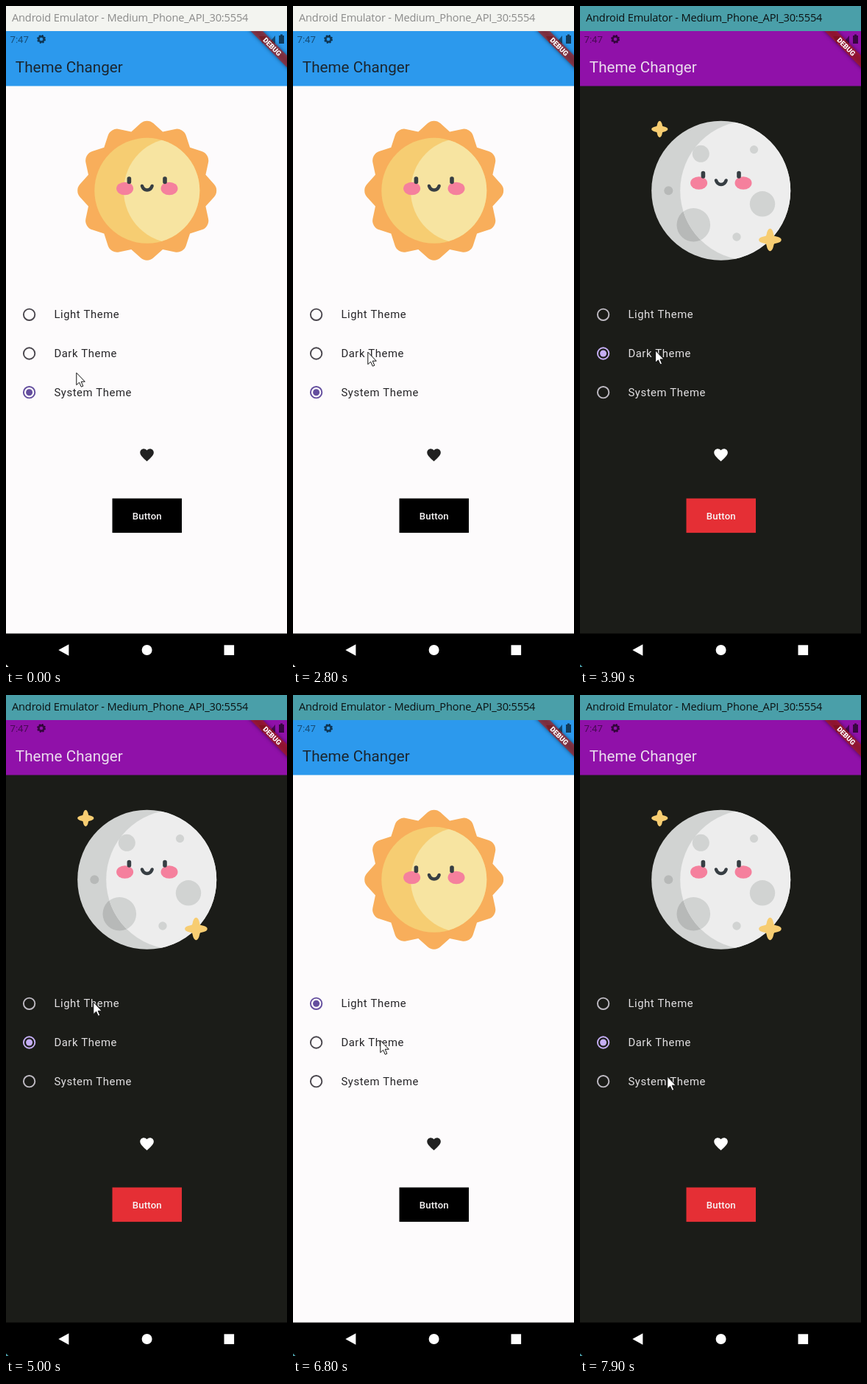
An HTML page with a canvas that plays this animation: 382 by 896 pixels, repeating every 8000 ms.

```html
<!DOCTYPE html>
<html lang="en">
<head>
<meta charset="utf-8">
<title>Theme Changer</title>
<style>
html, body { margin: 0; width: 100%; height: 100%; overflow: hidden; background: #fdfbfc; }
canvas { display: block; width: 382px; height: 896px; }
</style>
</head>
<body>
<canvas id="stage"></canvas>
<script>
const W = 382, H = 896, LOOP = 8000, TAU = Math.PI * 2;
const canvas = document.getElementById('stage');
const ctx = canvas.getContext('2d');
const dpr = window.devicePixelRatio || 1;
canvas.width = W * dpr;
canvas.height = H * dpr;

const LIGHT = {
  page: '#fdfbfc', bar: '#2c99ed', title: '#1b2630', ink: [38, 37, 40], ring: '#4a464d',
  accent: '#644e9e', heart: '#212121', button: '#000', press: [0, 0.038]
};
const DARK = {
  page: '#1b1c18', bar: '#9011a9', title: '#ebdcee', ink: [226, 224, 226], ring: '#bfbbc3',
  accent: '#c5aef5', heart: '#fff', button: '#e52f35', press: [255, 0.17]
};

const ROWS = ['Light Theme', 'Dark Theme', 'System Theme'];
const rowY = i => 418.3 + i * 52.7;

// Each tap: press time, switch time, chosen row
const TAPS = [
  { press: 2850, at: 2940, row: 1 },
  { press: 5050, at: 5125, row: 0 },
  { press: 6850, at: 6940, row: 1 }
];

// Pointer moves: start, end, target x, target y
const HOME = [96, 497];
const MOVES = [
  [1900, 2600, 102, 469],
  [3800, 4600, 119, 416],
  [5600, 6300, 119, 468],
  [7200, 7700, 119, 517]
];

const HEART = new Path2D('M12 21.35l-1.45-1.32C5.4 15.36 2 12.28 2 8.5 2 5.42 4.42 3 7.5 3c1.74 0 3.41.81 4.5 2.09C13.09 3.81 14.76 3 16.5 3 19.58 3 22 5.42 22 8.5c0 3.78-3.4 6.86-8.55 11.54L12 21.35z');
const ARROW = new Path2D('M0 0V16.5L3.8 13L6.5 19L9 18L6.4 12H11.5Z');

const clamp = v => Math.max(0, Math.min(1, v));
const mix = (a, b, k) => a + (b - a) * k;
const ease = k => k * k * (3 - 2 * k);

function rect(x, y, w, h, color) {
  ctx.fillStyle = color;
  ctx.fillRect(x, y, w, h);
}

function oval(x, y, rx, ry, color) {
  ctx.beginPath();
  ctx.ellipse(x, y, rx, ry, 0, 0, TAU);
  ctx.fillStyle = color;
  ctx.fill();
}

const disc = (x, y, r, color) => oval(x, y, r, r, color);

function ring(x, y, r, width, color) {
  ctx.beginPath();
  ctx.arc(x, y, r, 0, TAU);
  ctx.strokeStyle = color;
  ctx.lineWidth = width;
  ctx.stroke();
}

function poly(points, color) {
  ctx.beginPath();
  points.forEach(p => ctx.lineTo(...p));
  ctx.closePath();
  ctx.fillStyle = color;
  ctx.fill();
}

function text(str, x, y, font, color, spacing = 0, align = 'left') {
  ctx.font = font;
  ctx.letterSpacing = spacing + 'px';
  ctx.textAlign = align;
  ctx.fillStyle = color;
  ctx.fillText(str, x, y);
}

function clipDisc(x, y, r, draw) {
  ctx.save();
  ctx.beginPath();
  ctx.arc(x, y, r, 0, TAU);
  ctx.clip();
  draw();
  ctx.restore();
}

function face(dy) {
  const ink = '#373e43';
  for (const side of [-1, 1]) {
    oval(191.8 + side * 30.2, 247.5 + dy, 11.5, 8.7, '#f5809d');
    ctx.beginPath();
    ctx.roundRect(191.7 + side * 24.3 - 2.8, 231.3 + dy, 5.6, 10, 2.8);
    ctx.fillStyle = ink;
    ctx.fill();
  }
  ctx.beginPath();
  ctx.moveTo(185, 244 + dy);
  ctx.bezierCurveTo(187.5, 251.3 + dy, 196.1, 251.3 + dy, 198.6, 244 + dy);
  ctx.strokeStyle = ink;
  ctx.lineWidth = 4.5;
  ctx.lineCap = 'round';
  ctx.stroke();
  ctx.lineCap = 'butt';
}

function sun() {
  const at = i => {
    const a = i * TAU / 24 - TAU / 4, r = i % 2 ? 82.5 : 99;
    return [191.7 + r * Math.cos(a), 250.2 + r * Math.sin(a)];
  };
  ctx.beginPath();
  ctx.moveTo(...at(-1));
  for (let i = 0; i < 24; i += 2) {
    ctx.arcTo(...at(i), ...at(i + 1), 13);
    ctx.lineTo(...at(i + 1));
  }
  ctx.closePath();
  ctx.fillStyle = '#f8ae5b';
  ctx.fill();
  disc(191.8, 250.3, 71.5, '#f6cd72');
  clipDisc(191.8, 250.3, 71.5, () => disc(231.5, 250.3, 71.5, '#f7e4a1'));
  face(0);
}

function craters(color) {
  [[164.3, 200.3, 11.5], [236.5, 194.6, 5.6], [120.3, 250.3, 6], [248, 268.3, 17.2],
   [213, 313, 5.7], [154.3, 296.7, 22.8]].forEach(c => disc(...c, color));
}

function sparkle(x, y, r) {
  const color = '#f7cd72';
  oval(x, y, r, r * 0.37, color);
  oval(x, y, r * 0.37, r, color);
  disc(x, y, r * 0.5, color);
}

function moon() {
  disc(191.7, 250.3, 94.5, '#d1d3d2');
  craters('#b7b9b8');
  clipDisc(191.7, 250.3, 94.5, () => {
    clipDisc(230.7, 250.3, 94.5, () => {
      rect(90, 150, 200, 200, '#ededed');
      craters('#d1d3d2');
    });
  });
  face(-7.5);
  sparkle(108.3, 167, 11.2);
  sparkle(258.4, 317, 15.3);
}

function statusBar() {
  const ink = 'rgba(0,0,0,.5)';
  text('7:47', 5.5, 50, '13.2px Roboto, sans-serif', ink);
  const dark = 'rgba(0,0,0,.62)';
  ring(48, 45, 3.6, 2.6, dark);
  ctx.setLineDash([2.2, 1.9]);
  ring(48, 45, 5.2, 1.6, dark);
  ctx.setLineDash([]);
  poly([[344, 41], [354, 41], [349, 51]], ink);
  poly([[357, 51], [366, 51], [366, 40]], ink);
  rect(371, 40, 7, 11, dark);
  rect(373, 38.5, 3, 1.5, dark);
}

function banner() {
  ctx.save();
  ctx.beginPath();
  ctx.rect(0, 34, W, 817);
  ctx.clip();
  ctx.translate(W, 34);
  ctx.rotate(Math.PI / 4);
  ctx.filter = 'blur(2.5px)';
  rect(-40, 23.3, 80, 11.6, 'rgba(0,0,0,.5)');
  ctx.filter = 'none';
  rect(-40, 23.3, 80, 11.6, 'rgba(183,28,28,.63)');
  text('DEBUG', 0.8, 32.6, '900 9.6px Roboto, sans-serif', '#fff', 0, 'center');
  ctx.restore();
}

function navBar(frame) {
  rect(0, 850.6, W, 45.4, '#000');
  poly([[71.3, 873], [85.4, 865.3], [85.4, 880.8]], '#fff');
  disc(191.6, 873, 7, '#fff');
  rect(296.5, 866.3, 13.6, 13.6, '#fff');
  poly([[0, 892.5], [0, H], [3.5, H]], frame);
}

function radio(y, on, th) {
  const color = on ? th.accent : th.ring;
  ring(31.6, y, 7.7, 1.9, color);
  if (on) disc(31.6, y, 4.5, color);
}

function pointer(t) {
  let [x, y] = HOME;
  for (const [start, end, tx, ty] of MOVES) {
    const k = ease(clamp((t - start) / (end - start)));
    x = mix(x, tx, k);
    y = mix(y, ty, k);
  }
  ctx.save();
  ctx.translate(x - 0.2, y + 0.2);
  ctx.fillStyle = '#fff';
  ctx.strokeStyle = '#111';
  ctx.lineWidth = 1;
  ctx.fill(ARROW);
  ctx.stroke(ARROW);
  ctx.restore();
}

function draw(t) {
  const tap = TAPS.filter(p => t >= p.at).pop();
  const chosen = tap ? tap.row : 2;
  const th = chosen === 1 ? DARK : LIGHT;
  const focused = t >= TAPS[0].press;
  const frame = focused ? '#4a9fa9' : '#f3f4f0';

  ctx.setTransform(dpr, 0, 0, dpr, 0, 0);
  rect(0, 0, W, H, th.page);
  rect(0, 0, W, 34, frame);
  text('Android Emulator - Medium_Phone_API_30:5554', 8, 21,
    '14.6px "Open Sans", sans-serif', focused ? '#0b1112' : '#8b8b8a', -0.17);

  rect(0, 34, W, 74.5, th.bar);
  statusBar();
  text('Theme Changer', 12.8, 89.8, '20.6px Roboto, sans-serif', th.title, 0.05);
  if (th === DARK) moon(); else sun();

  // Press highlight holds through the switch, then fades
  for (const p of TAPS) {
    const k = clamp((t - p.press) / 60) * clamp((p.at + 280 - t) / 200);
    const [v, a] = th.press;
    if (k > 0) rect(0, rowY(p.row) - 26.3, W, 52.7, `rgba(${v},${v},${v},${a * k})`);
  }

  // Labels fade from the previous theme's ink
  const k = tap ? clamp((t - tap.at) / 200) : 1;
  const old = th === DARK ? LIGHT : DARK;
  const ink = `rgb(${th.ink.map((v, i) => Math.round(mix(old.ink[i], v, k)))})`;
  ROWS.forEach((label, i) => {
    radio(rowY(i), i === chosen, th);
    text(label, 65.4, rowY(i) + 5, '14.87px Roboto, sans-serif', ink, 0.57);
  });

  ctx.save();
  ctx.translate(180.4, 597.4);
  ctx.scale(0.929, 0.929);
  ctx.fillStyle = th.heart;
  ctx.fill(HEART);
  ctx.restore();

  rect(144.5, 667.5, 94.5, 46.6, th.button);
  text('Button', 191.8, 695.7, '500 13.2px Roboto, sans-serif', '#f7f5f6', 0.15, 'center');

  banner();
  navBar(frame);
  pointer(t);
}

const begin = performance.now();
function tick() {
  draw((performance.now() - begin) % LOOP);
  requestAnimationFrame(tick);
}
tick();
</script>
</body>
</html>
```
